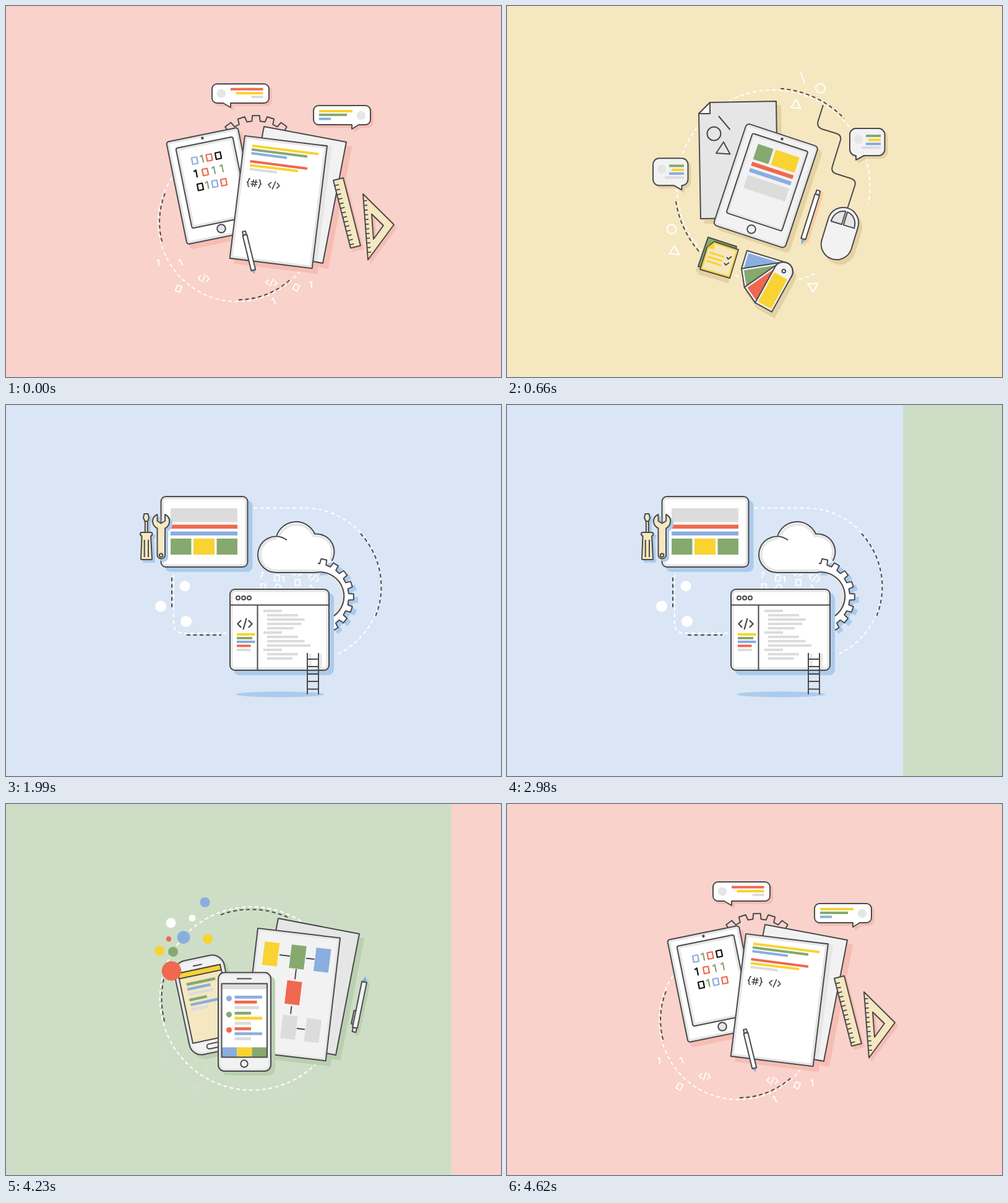
An HTML page for the animation above (5150 ms loop, 800 px wide and 600 px high).

```html
<!DOCTYPE html>
<html lang="en">
<head>
<meta charset="utf-8">
<title>Design and development scenes</title>
<style>
  html, body { margin: 0; width: 100%; height: 100%; overflow: hidden; }
  svg { position: absolute; left: 0; top: 0; width: 800px; height: 600px;
        fill: none; stroke: #4a4a4c; stroke-width: 2; stroke-linejoin: round; }
  .shadow { filter: drop-shadow(var(--dx, 5px) var(--dy, 5px) 0 var(--shade)); }
  .dash { stroke-dasharray: 6 4.5; }
</style>
</head>
<body>
<script>
const red = '#f0684f', yellow = '#f9d331', green = '#86a96f', blue = '#89aedf';
const gray = '#dcdcdc', edge = '#e6e6e6', pale = '#f2f2f2', cream = '#f5e7c0', white = '#fff', ink = '#4a4a4c';

// Drawing helpers, each returning markup
const path = (d, fill = 'none', stroke = ink, w = 2) =>
  `<path d="${d}" fill="${fill}" stroke="${stroke}" stroke-width="${w}"/>`;
const line = (color, d, w = 4) => path(d, 'none', color, w);
const dashed = (color, d) => `<path class="dash" d="${d}" stroke="${color}"/>`;
const rect = (x, y, w, h, fill, stroke = 'none', r = 0) =>
  `<rect x="${x}" y="${y}" width="${w}" height="${h}" rx="${r}" fill="${fill}" stroke="${stroke}"/>`;
const circle = (x, y, r, fill = 'none', stroke = 'none') =>
  `<circle cx="${x}" cy="${y}" r="${r}" fill="${fill}" stroke="${stroke}"/>`;
const ring = (x, y, r) => `<circle class="dash" cx="${x}" cy="${y}" r="${r}" stroke="${white}"/>`;
const at = (x, y, angle, ...parts) => `<g transform="translate(${x} ${y}) rotate(${angle})">${parts.join('')}</g>`;
const shadow = (dx, dy, ...parts) => `<g class="shadow" style="--dx:${dx}px;--dy:${dy}px">${parts.join('')}</g>`;
const panel = (x, y, w, h, r, inner = white, inset = 4.5) =>
  rect(x, y, w, h, edge, ink, r) +
  rect(x + inset, y + inset, w - 2 * inset, h - 2 * inset, inner, 'none', Math.max(0, r - 4));

// Horizontal bars: [color, x, center y, length]
const bars = (list, w = 4) => list.map(([c, x, y, len]) => line(c, `M${x},${y}h${len}`, w)).join('');

const glyphs = {
  0: 'M-4.2,-5.2h8.4v10.4h-8.4z',
  1: 'M-3,-4L1,-6V6',
  tag: 'M-4.5,-4.5L-9,0L-4.5,4.5M4.5,-4.5L9,0L4.5,4.5M2,-7L-2,7',
  hash: 'M-7,-6.5q-2.5,0 -2.5,3t-2,3.5q2,0 2,3.5t2.5,3M7,-6.5q2.5,0 2.5,3t2,3.5q-2,0 -2,3.5t-2.5,3M-1.2,-6L-2.4,6M2.6,-6L1.4,6M-5,-2H5.5M-5.5,2H5'
};
const glyph = (kind, x, y, angle, color, scale = 1, w = 2) =>
  `<g transform="translate(${x} ${y}) rotate(${angle}) scale(${scale})">${line(color, glyphs[kind], w / scale)}</g>`;
const scatter = (color, list) => list.map(([k, x, y, a, s]) => glyph(k, x, y, a, color, s, 1.8)).join('');

function gear(cx, cy, r, R, first, step, count) {
  const pts = [];
  for (let i = 0; i < count; i++)
    for (const [rad, off] of [[r, -5.6], [R, -4.3], [R, 4.3], [r, 5.6]]) {
      const a = (first + i * step + off) * Math.PI / 180;
      pts.push((cx + rad * Math.cos(a)).toFixed(1) + ',' + (cy + rad * Math.sin(a)).toFixed(1));
    }
  return pts.join('L');
}

// Speech bubble: tail is relative to the bottom edge, drawn right to left
function bubble(x, y, w, h, r, fill, tail, dotX, dotY, lines) {
  const [right, tip, left] = tail;
  return shadow(4, 4, path(
    `M${x + r},${y}H${x + w - r}a${r},${r} 0 0 1 ${r},${r}V${y + h - r}a${r},${r} 0 0 1 -${r},${r}` +
    `H${right}L${tip},${y + h + 7}L${left},${y + h}H${x + r}a${r},${r} 0 0 1 -${r},-${r}V${y + r}a${r},${r} 0 0 1 ${r},-${r}z`, fill)) +
    circle(dotX, dotY, 7.2, edge) + bars(lines);
}

function codeScene() {
  const digits = [
    [0, 305, 250, blue], [1, 317, 247.5, green], [0, 328.5, 245, red], [0, 343, 242, '#111'],
    [1, 307, 271.5, '#111'], [0, 322, 268.5, red], [1, 336, 266, green], [1, 349, 263, green],
    [0, 314, 292.5, '#111'], [1, 325.5, 290, green], [0, 337.5, 287.5, blue], [0, 352, 285, red]];
  return ring(374, 350, 128) +
    dashed(ink, 'M257,303A125.5,125.5 0 0 0 253,384') + dashed(ink, 'M376,475A125.5,125.5 0 0 0 461,441') +
    path('M' + gear(404, 254, 68, 77, -126, 18, 5)) +
    shadow(6, 7,
      at(259, 220, -11.5,
        panel(0, 0, 118, 169, 4), panel(13, 13, 94, 132, 3),
        circle(58.5, 5.5, 2.2, ink)),
      circle(348, 360, 6.8, edge, ink)) +
    digits.map(([k, x, y, c]) => glyph(k, x, y, -11.5, c, 1, 2.2)).join('') +
    shadow(8, 8,
      path('M417,195L550,220L512,416L379,391z', pale),
      path('M519,226L527,227L503,413L490,411z', edge, 'none'),
      at(386, 210, 7, panel(0, 0, 134, 199.4, 0))) +
    line(yellow, 'M398,226L505,239.5') + line(green, 'M397,232L487,243.5') + line(blue, 'M396.5,238L454,245.5') +
    line(red, 'M394.5,251L487,263') + line(yellow, 'M394,257.5L472,267') + line(gray, 'M393.5,263.5L438,269') +
    glyph('hash', 401, 286.5, 7, ink, 1, 1.7) + glyph('tag', 433, 290, 7, ink, 1, 1.7) +
    at(384.5, 364.5, -13.7,
      path('M-3.5,64h7L0,70z', blue, blue, 1),
      rect(-2.5, 0, 5, 6, white, ink), rect(-3.5, 6, 7, 58.5, white, ink)) +
    shadow(4, 5,
      at(529, 282, -14.3, rect(0, 0, 16.5, 113, cream, ink),
        `<path d="M3.5,8V110" stroke-width="7" stroke-dasharray="1.8 5.8"/>`),
      `<path d="M577,304L627,353.5L585,410.5zM591,336.5L594,377L610,355z" fill="${cream}" fill-rule="evenodd"/>`,
      `<path d="M580.6,314L587.6,403" stroke-width="5.5" stroke-dasharray="1.8 5.8"/>`) +
    bubble(333, 126, 92, 31, 8, white, [363, 363, 351], 348, 141.5,
      [[red, 363, 134.5, 52.5], [yellow, 371.5, 141, 44], [gray, 396.5, 147, 19]]) +
    bubble(497, 161, 92, 31, 8, white, [570, 559, 559], 574, 177,
      [[yellow, 506, 170, 54], [green, 506, 176, 45], [blue, 506, 182.5, 19]]) +
    scatter(white, [[1, 246, 415.5, 0, .85], [1, 282.5, 415, -22, .85], [0, 279, 457, 25, .9], ['tag', 319.5, 440.5, 4],
      ['tag', 429, 447.5, 8], [0, 469, 455, 25, .9], [1, 493, 451, 0, .85], [1, 433, 478, -22, .85]]);
}

function designScene() {
  const swatch = (angle, color) => at(446.5, 429.5, angle,
    path('M-15.3,0a15.3,15.3 0 0 1 30.6,0V66H-15.3z', pale), rect(-12, 8, 24, 54.5, color));
  const button = 'M-1.5,-15H-19.5C-19.5,-27 -12,-36 -1.5,-37z';
  return dashed(white, 'M497,433A156,156 0 1 1 584,320') +
    dashed(ink, 'M442,133.5A159.5,159.5 0 0 1 545,182') + dashed(ink, 'M273,316A159.5,159.5 0 0 0 313,400') +
    path('M511,160L502.5,187Q500.5,196 509,199L532,206Q541,209 539,217L526,259Q523,268 531,271L556,279Q565,282 562,291L550,328') +
    shadow(7, 7,
      path('M310,174L328,156L435,154L438,342L313,344z', edge),
      path('M314,178L331,176L328,158z', gray, 'none'),
      path('M310,174L328,156L328,174z', white)) +
    path('M342,178L360.5,200M350,220L360.5,239.5L338,238z') + circle(334.5, 206.5, 11, 'none', ink) +
    shadow(6, 7,
      at(387.5, 189.5, 18.3,
        panel(0, 0, 122, 173, 6, pale, 4), panel(14, 12.5, 94.5, 135.5, 3, pale, 4),
        rect(28, 26, 26, 26, green), rect(58, 26, 40.5, 26, yellow), rect(28, 56.3, 70.5, 6.5, red),
        rect(28, 67, 70.5, 6.5, blue), rect(28, 79, 70.5, 22, gray)),
      circle(444.5, 215, 2.2, ink), circle(395, 361, 6.8, pale, ink)) +
    `<g style="--shade:#f6cfa5">${shadow(4, 3, at(503.5, 298.5, 17.5,
      path('M-3.8,82h7.6L0,92z', blue, 'none'),
      rect(-3, 0, 6, 7, white, ink), rect(-3.8, 7, 7.6, 75, white, ink)))}</g>` +
    shadow(5, 7, at(538, 368, 17,
      rect(-25, -43, 50, 86, pale, ink, 25), path(button, edge),
      `<g transform="scale(-1 1)">${path(button, edge)}</g>`)) +
    bubble(554, 198, 56.5, 44, 10, pale, [577, 564, 564], 568, 215.5,
      [[green, 580, 210, 24], [yellow, 584, 216.5, 20], [blue, 580, 223, 24], [gray, 573, 229, 31]]) +
    bubble(236, 246.3, 56.5, 44, 10, pale, [282.5, 282.5, 270], 250, 264,
      [[green, 262, 258.5, 24], [yellow, 266, 265, 20], [blue, 262, 271, 24], [gray, 255, 277.5, 31]]) +
    shadow(-3, 7,
      path('M325,374L371,389L356,435L309,421z', green),
      path('M323,391L335,381L374,394L360,440L312,426z', cream),
      path('M325,392L335.5,383.5L371.5,395.5L358.7,437.3L314.8,424.5z', 'none', yellow),
      path('M324,391L335.5,382L334,393z', yellow, yellow, 1)) +
    line(yellow, 'M327.5,398.5L351,406M325,405.5L348,412.5M322.5,412L346,419.5', 3) +
    path('M355,406L357.5,409.5L363,405M351,415.5L353.5,419L359,415') +
    shadow(4, 9, swatch(107, blue), swatch(81, green), swatch(55, red), swatch(29, yellow)) +
    circle(447.3, 428.7, 2.8, white, ink) +
    circle(506.5, 133, 7.5, 'none', white) + circle(266, 361, 7.5, 'none', white) +
    line(white, 'M474.5,107L481,125M467,151L475,165.5L459,164zM270.5,388L278.5,402L262.5,400.5zM486,449L502,449L495,462.5z', 2);
}

function buildScene() {
  const teeth = gear(500, 310, 54, 62, -77, 19.3, 8);
  const textLines = [[416, 30], [422, 50], [422, 60.5], [422, 55], [422, 43], [416, 30],
    [422, 50], [422, 60.5], [422, 70], [416, 30], [422, 50], [422, 41]];
  const cloudTop = 'M437,213A33,33 0 0 1 499,208.5A29,29 0 0 1 526.5,252';
  return dashed(white, 'M400,166.5H479A124.5,124.5 0 0 1 536,403') +
    dashed(white, 'M271,264V353Q271,369 287,369H358') +
    dashed(ink, 'M573,208A127,127 0 0 1 597,342') + dashed(ink, 'M268,279V328M292,372H348') +
    shadow(7, 7, panel(250.5, 148, 140, 114, 8)) +
    rect(266, 167, 108, 22.5, gray) + rect(266, 193.5, 108, 6.5, red) + rect(266, 204.5, 108, 6.5, blue) +
    rect(266, 216, 33.5, 26, green) + rect(303, 216, 34, 26, yellow) + rect(340.5, 216, 33.5, 26, green) +
    shadow(4, 4,
      path('M224.8,187V207H228.8V187', cream),
      path('M223.3,176H229.5L231,182.5L229,188H224.5L222,182.5z', cream),
      path('M219.5,206H233.5Q236.5,206 236.5,208.5T234,212L236,249Q236,250 235,250H219Q218,250 218,249L219.5,212Q217,211 217,208.5T219.5,206z', cream),
      path('M223.7,218V246M230,218V246'),
      path('M244.5,177V187.5L250.5,191.5L257,187.5V177C266,181 267,194 257,199.5V243a6.3,6.3 0 0 1 -12.5,0V199.5C234,194 235,181 244.5,177z', cream),
      circle(250.6, 243, 2.8, cream, ink)) +
    scatter(white, [[1, 413, 275, 25, .8], [0, 438, 280, 8, .9], [1, 448, 282, 0, .8], ['tag', 469, 271, 20],
      [0, 471, 287, 0, .9], ['tag', 497, 280, 25], [0, 415.5, 294, 0, .9], [0, 439, 295, 30, .9], [1, 494, 296, -20, .8]]) +
    shadow(7, 5, path(`M500,271L504,256L${teeth}L515,362L523,345A39,39 0 0 0 500,271z`, white, 'none')) +
    path('M437,271A29,29 0 0 1 437,213A33,33 0 0 1 499,208.5A29,29 0 0 1 526.5,252L500,271z', white, 'none') +
    line(edge, 'M437,268H500A42,42 0 0 1 525.5,343M437,268A26,26 0 0 1 437,216M441,213A30,30 0 0 1 497,212A26,26 0 0 1 524,250') +
    path('M523,345A39,39 0 0 0 500,271H437A29.2,29.2 0 1 1 454,218.5' + cloudTop) +
    path(`M504,256L${teeth}L524,360`) +
    shadow(7, 7, panel(362, 298, 160, 131, 8)) +
    path('M362,323.5H522M406.5,323.5V429') +
    [375, 384, 393].map(x => circle(x, 312, 3, 'none', ink)).join('') +
    glyph('tag', 386, 354, 0, ink, 1.3, 2.2) +
    bars([[yellow, 373, 371, 29.5], [green, 373, 377, 25], [blue, 373, 383, 29.5], [red, 373, 389.5, 22.5], [gray, 373, 396, 22.5]]) +
    bars(textLines.map(([x, len], i) => [gray, x, 333 + 7 * i, len])) +
    `<ellipse cx="443" cy="468" rx="71.5" ry="4.7" fill="#accbec" stroke="none"/>` +
    line(edge, 'M491.5,402V427M508.5,402V427') +
    path('M487,401V468M505,401V468M487,411H505M487,423H505M487,435H505M487,447H505M487,459.5H505') +
    circle(250, 325.5, 9, white) + circle(289, 293, 8.5, white) + circle(291, 350, 9, white);
}

function mobileScene() {
  const boxes = [[428, 242.5, yellow], [471.5, 247.5, green], [511.2, 252.5, blue],
    [464.3, 305.3, red], [457.3, 361, gray], [495.8, 366.3, gray]];
  return ring(397, 314.5, 148.3) +
    dashed(ink, 'M347,179A144.5,144.5 0 0 1 455,183') + dashed(ink, 'M255,283A145.3,145.3 0 0 0 257,354') +
    scatter('#d5ddd4', [[0, 258, 410, 25], [1, 277, 433, -20], [1, 324, 426, 0], ['tag', 311, 457, 0],
      [0, 457, 463, 25], [1, 461, 428, -20]]) +
    shadow(7, 8,
      path('M440,185L571,210L533,406L402,381z', edge),
      at(407, 201, 6.7, panel(0, 0, 134, 200, 0, pale, 4))) +
    boxes.map(([x, y, c]) => at(x, y, 7, rect(-12, -19, 24, 38, c))).join('') +
    path('M442,244L459,246M485,249.5L498.5,251M469,267L467,283.5M461.5,327L460,339.5M470,363L483,364.5') +
    shadow(4, 4, at(581, 278.5, 11.6,
      path('M-4.5,9.5L0,0L4.5,9.5z', blue, 'none'), path('M-4,58h-3V80h3'),
      rect(-3, 85, 6, 7, pale, ink), rect(-4, 9.5, 8, 75.5, pale, ink))) +
    shadow(6, 6, at(278, 274, -12,
      panel(-6, -18, 82, 155, 20, pale, 4),
      rect(0, 0, 69.5, 115.5, cream, ink), rect(0, 0, 69.5, 9, yellow, ink),
      path('M26,-6.5H41'), rect(21, 122, 28, 8, pale, ink, 4),
      bars([[green, 10, 20.5, 47], [blue, 9.5, 28.5, 38], [gray, 9.5, 36.7, 42],
        [green, 9, 46, 29], [blue, 9.5, 54, 47], [gray, 9, 62, 28]], 4.5))) +
    shadow(6, 6, panel(343, 272.5, 85, 159.5, 10, pale, 4)) +
    path('M373,282.5H397') +
    rect(348.5, 290.5, 73.5, 119, white) + rect(348.5, 290.5, 73.5, 9, gray) +
    rect(348.5, 393.5, 25, 16, blue) + rect(373.5, 393.5, 24, 16, yellow) + rect(397.5, 393.5, 24.5, 16, green) +
    rect(348.5, 290.5, 73.5, 119, 'none', ink) + circle(385, 420, 5.7, pale, ink) +
    circle(360.5, 314.5, 4.5, blue) + circle(360.5, 340.5, 4.5, green) + circle(360.5, 365.5, 4.5, red) +
    bars([[blue, 44.5, 312.3], [red, 36, 320.4], [gray, 39.5, 329.3], [green, 26.5, 338.3], [yellow, 44.5, 346.4],
      [gray, 26.5, 354.6], [red, 26.5, 363.5], [blue, 44.5, 371.5], [gray, 26.5, 379.6]]
      .map(([c, len, y]) => [c, 369.5, y, len]), 4.7) +
    [[321.5, 159, 8, blue], [266.5, 192.3, 8, white], [301, 184.5, 5.5, white], [263, 218.3, 4.2, red],
      [287, 215.7, 10.5, blue], [326, 218.3, 8, yellow], [248, 237.3, 8, yellow], [270, 239, 8, green],
      [267.5, 270, 15.7, red]].map(d => circle(...d)).join('');
}

const LOOP = 5150, STEP = 30;
const scenes = [
  { start: 4230, bg: '#f9d2cb', shade: '#f6bdb3', draw: codeScene },
  { start: 360, bg: '#f5e7c0', shade: '#e5d2a3', draw: designScene },
  { start: 1660, bg: '#dae6f5', shade: '#accbec', draw: buildScene },
  { start: 2950, bg: '#cedec6', shade: '#bad0b0', draw: mobileScene }
];

for (const s of scenes) {
  document.body.insertAdjacentHTML('beforeend',
    `<svg viewBox="0 0 800 600" style="--shade:${s.shade}">${rect(0, 0, 800, 600, s.bg)}${s.draw()}</svg>`);
  s.el = document.body.lastElementChild;
}

// The youngest scene slides in from the right, over the one before it
function render() {
  const t = performance.now() % LOOP;
  for (const s of scenes) {
    const age = (t - s.start + LOOP) % LOOP;
    const x = Math.max(0, 720 - 80 * Math.floor(age / STEP));
    s.el.style.transform = `translateX(${x}px)`;
    s.el.style.zIndex = Math.floor(LOOP - age);
  }
  requestAnimationFrame(render);
}
render();
</script>
</body>
</html>
```
